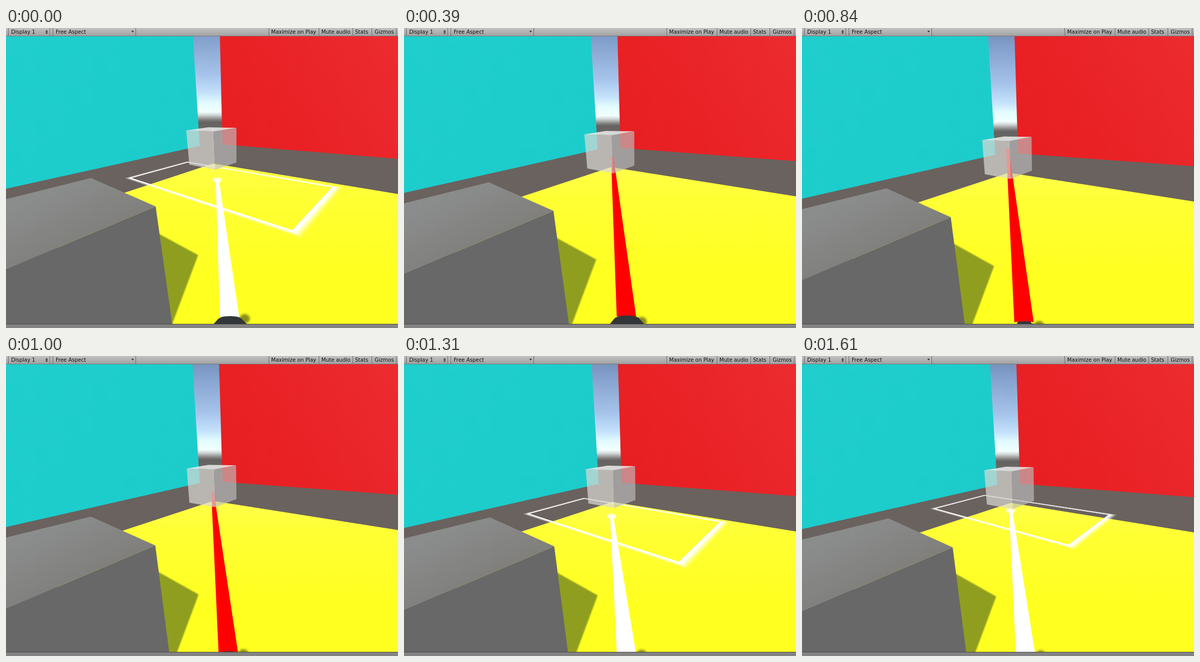
Recreate the animation shown at these times as an HTML page with a canvas. Size 757x580 px, loop 1690 ms.

```html
<!DOCTYPE html>
<html lang="en">
<head>
<meta charset="utf-8">
<title>Laser pointer scene</title>
<style>
  html, body { margin: 0; width: 757px; height: 580px; overflow: hidden; background: #838383; }
  svg, canvas { position: absolute; left: 0; top: 0; display: block; }
  canvas { top: 16px; }
  text { font: 10px "DejaVu Sans", sans-serif; fill: #111; }
  .foot { position: absolute; left: 0; top: 572px; width: 757px; height: 1px; background: #4c4c4c; }
</style>
</head>
<body>
<svg width="757" height="16">
  <defs>
    <linearGradient id="bar" x2="0" y2="1">
      <stop stop-color="#c2c2c2"/><stop offset="1" stop-color="#a0a0a0"/>
    </linearGradient>
  </defs>
  <rect width="757" height="16" fill="url(#bar)"/>
  <path d="M0 15.5H757" stroke="#7a7a7a"/>
  <path d="M4.5 0V15M84.5 0V15M90.5 0V15M250.5 0V15M507.5 0V15M604.5 0V15M669.5 0V15M706.5 0V15M753.5 0V15" stroke="#6c6c6c"/>
  <path d="M76 7l2.5-3 2.5 3zM76 8.500l2.500 3 2.500-3zM242 5.500h5l-2.500 3z" fill="#222"/>
  <text x="10" y="11">Display 1</text>
  <text x="96" y="11">Free Aspect</text>
  <text x="512" y="11">Maximize on Play</text>
  <text x="609" y="11">Mute audio</text>
  <text x="674" y="11">Stats</text>
  <text x="712" y="11">Gizmos</text>
</svg>
<canvas id="view" width="757" height="556"></canvas>
<div class="foot"></div>
<script>
const ctx = document.getElementById('view').getContext('2d');
const LOOP = 1690, STEP = 76.8, STEPS = 22;

// step, pitch, shift, skew, tip x, tip y, beam base x, controller top
const POSES = [
  [0, 0, 0, 0, 408, 292, 413, 556],
  [3, .125, 0, -2.3, 408, 269, 412, 554],
  [8, .667, -2.8, -3, 394, 228, 409, 556],
  [11, .833, -3.4, -2.7, 397, 236, 410, 566],
  [15, .875, -1.5, -1.2, 401, 294, 411, 574],
  [17, .917, -.7, -.4, 401, 308, 411, 574],
  [21, 1, 0, 0, 403, 297, 413, 574]
];
// step, then inner corners of the floor area: back, left, front, right
const AREAS = [
  [0, 351, 260, 242, 290, 553, 391, 630, 308],
  [3, 357, 248, 267, 271, 514, 333, 587, 282],
  [15, 350, 268, 255, 293, 510, 361, 586, 303],
  [17, 348, 276, 242, 305, 531, 398, 610, 321],
  [21, 353, 270, 258, 295, 515, 365, 592, 307]
];

const lerp = (a, b, t) => a + (b - a) * t;

function blend(a, b, step) {
  const t = (step - a[0]) / (b[0] - a[0]);
  return a.slice(1).map((n, i) => lerp(n, b[i + 1], t));
}

function sample(keys, step) {
  let i = 0;
  while (i < keys.length - 2 && step >= keys[i + 1][0]) i++;
  return blend(keys[i], keys[i + 1], step);
}

function trace(pts) {
  pts.forEach(([x, y], i) => i ? ctx.lineTo(x, y) : ctx.moveTo(x, y));
  ctx.closePath();
}

function poly(fill, pts) {
  ctx.fillStyle = fill;
  ctx.beginPath();
  trace(pts);
  ctx.fill();
}

function oval(fill, x, y, rx, ry) {
  ctx.fillStyle = fill;
  ctx.beginPath();
  ctx.ellipse(x, y, rx, ry, 0, 0, 7);
  ctx.fill();
}

function grad(x0, y0, x1, y1, ...stops) {
  const g = ctx.createLinearGradient(x0, y0, x1, y1);
  stops.forEach(([at, color]) => g.addColorStop(at, color));
  return g;
}

// Projective map from the unit square to a quad
function plane([bx, by, lx, ly, fx, fy, rx, ry]) {
  const x1 = lx - fx, x2 = rx - fx, sx = bx - lx + fx - rx;
  const y1 = ly - fy, y2 = ry - fy, sy = by - ly + fy - ry;
  const den = x1 * y2 - x2 * y1;
  const g = (sx * y2 - x2 * sy) / den, h = (x1 * sy - sx * y1) / den;
  return (u, v) => {
    const w = 1 + g * u + h * v;
    return [
      (bx + (lx - bx + g * lx) * u + (rx - bx + h * rx) * v) / w,
      (by + (ly - by + g * ly) * u + (ry - by + h * ry) * v) / w
    ];
  };
}

function drawArea(quad) {
  const at = plane(quad), layers = 12;
  const ring = s => {
    const u = .056 * s, v = .037 * s;
    return [at(-u, -v), at(1 + u, -v), at(1 + u, 1 + v), at(-u, 1 + v)];
  };
  for (let i = 0; i < layers; i++) {
    ctx.fillStyle = `rgba(255,255,255,${1 / (layers - i)})`;
    ctx.beginPath();
    trace(ring(1 - .7 * i / (layers - 1)));
    trace(ring(0));
    ctx.fill('evenodd');
  }
}

function drawRoom(p, pitch) {
  const sky = 22 * pitch;
  ctx.fillStyle = '#6a625e';
  ctx.fillRect(0, 0, 757, 580);
  ctx.fillStyle = grad(0, sky - 10, 0, sky + 190,
    [0, '#7490b8'], [.13, '#829ecb'], [.5, '#a5c3ea'], [.68, '#c4e2fb'],
    [.77, '#e2fbff'], [.86, '#f2ffff'], [.89, '#d2d8d8'], [.94, '#7c7a78'],
    [.96, '#646362'], [1, '#686562']);
  ctx.fillRect(340, 0, 95, 225 + sky);

  poly(grad(0, 16, 370, 330, [0, '#1fcecd'], [1, '#1bcccb']), [
    [-10, 10], p(361, 16, 363, 16), p(374, 228, 377, 249), p(-10, 313, -10, 337)]);
  poly(grad(420, 240, 757, 16, [0, '#e81e21'], [.4, '#e92226'], [1, '#ec2c30']), [
    p(413, 16, 414, 16), [775, 10], p(775, 254.5, 775, 274.5), p(418, 225, 421, 247)]);
  poly(grad(0, 262 + sky, 0, 480, [0, '#ffff48'], [.3, '#ffff34'], [1, '#ffff20']), [
    p(400, 262, 403, 284), p(775, 324, 775, 344), [775, 590], [100, 590], p(100, 361, 100, 383)]);

  ctx.filter = 'blur(1.2px)';
  poly('#909e20', [
    p(290, 395, 290, 417), p(371, 439, 375, 465), p(320, 575, 334, 575), [290, 580]]);
  ctx.filter = 'none';

  const side = p(-10, 471, -10, 498), corner = p(289, 345, 291, 370);
  poly(grad(100, 300 + sky, 160, 420 + sky, [0, '#8b8d8d'], [1, '#7f7e7b']), [
    p(-10, 333.5, -10, 357.5), p(164, 290, 167, 314), corner, side]);
  poly('#686868', [side, corner, p(321, 572, 317, 572), [321, 585], [-10, 585]]);
}

function drawCube(p) {
  const left = p(348, 198, 352, 221), back = p(390, 192, 394, 214);
  const right = p(445, 193, 447, 215), mid = p(401, 200, 405, 223);
  const low = p(404, 274, 407, 296);
  poly('rgba(220,217,213,.7)', [left, mid, low, p(354, 264, 357, 287)]);
  poly('rgba(190,189,188,.66)', [mid, right, p(445, 260, 448, 280), low]);
  poly('rgba(232,234,230,.88)', [left, back, right, mid]);
}

function drawPointer(hit, pitch, x, y, base, top) {
  const color = hit ? '#fff' : '#f00', c = base + 20;
  const w = 20 + (572 - top) * .8, tip = hit ? 3 : 2.5;

  ctx.filter = 'blur(2px)';
  oval('rgba(125,130,20,.9)', c + 28, 562 + 16 * pitch, 10, 9);
  ctx.filter = 'none';
  poly('#333639', [
    [c - w, 573], [c - w + 10, top + 6], [c - 13, top + 1], [c - 2, top],
    [c + 12, top + 1], [c + w - 12, top + 5], [c + w, 573]]);

  ctx.fillStyle = color;
  ctx.beginPath();
  ctx.moveTo(x - tip, y);
  ctx.lineTo(x + tip, y);
  ctx.lineTo(base + 37.5, top + 3);
  ctx.quadraticCurveTo(c, top - 1, base, top + 3);
  ctx.fill();

  if (hit) {
    const r = Math.min(9, 5 + Math.max(0, y - 269) * .16);
    ctx.filter = 'blur(.8px)';
    oval('rgba(255,255,240,.9)', x, y + 2, r, r * .55);
    ctx.filter = 'none';
  } else {
    oval(color, x, y, 3, 3);
  }
}

function draw(step) {
  const [pitch, shift, skew, ...beam] = sample(POSES, step);
  const hit = step < 5 || step > 13;
  const p = (x0, y0, x1, y1) => {
    const x = lerp(x0, x1, pitch);
    return [x + shift, lerp(y0, y1, pitch) + skew * Math.max(0, x - 300) / 457];
  };
  ctx.setTransform(1, 0, 0, 1, 0, -16);
  drawRoom(p, pitch);
  if (hit) {
    const [a, b] = step < 5 ? AREAS : step < 17 ? AREAS.slice(2) : AREAS.slice(3);
    drawArea(blend(a, b, step));
  }
  drawPointer(hit, pitch, ...beam);
  drawCube(p);
}

const startOf = i => Math.round(i * STEP / 10) * 10;
let start, shown = -1;

function tick(now) {
  start ??= now;
  const t = (now - start) % LOOP;
  let step = STEPS - 1;
  while (step > 0 && startOf(step) > t) step--;
  if (step !== shown) draw(shown = step);
  requestAnimationFrame(tick);
}
draw(0);
requestAnimationFrame(tick);
</script>
</body>
</html>
```
